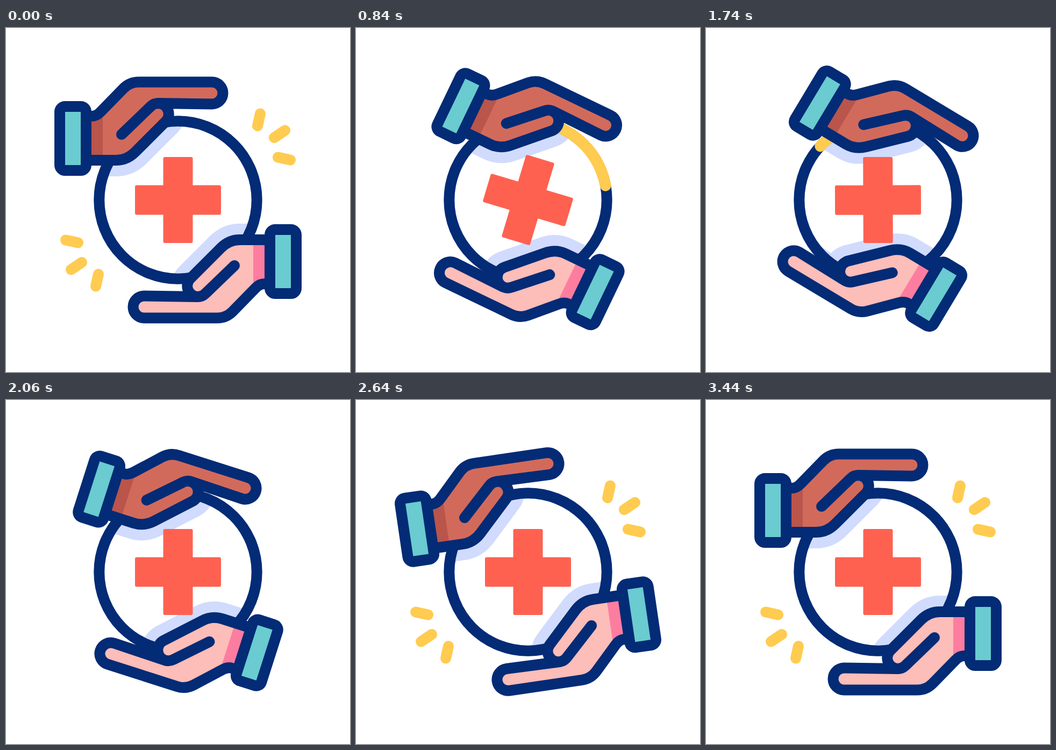
These frames come from a looping animation (640x640 px, 3600 ms). An HTML page:

```html
<!DOCTYPE html>
<html lang="en">
<head>
<meta charset="utf-8">
<title>Caring hands</title>
<style>
  html, body { margin: 0; height: 100%; overflow: hidden; background: #fff; }
  svg { display: block; width: 100%; height: 100%; }
  .line { stroke: #032b76; stroke-width: 20; stroke-linecap: round; stroke-linejoin: round; }
  .shadow { fill: #d1dbfd; stroke: #d1dbfd; stroke-width: 60; stroke-linejoin: round; }
  .yellow { fill: none; stroke: #ffcb50; stroke-width: 20; stroke-linecap: round; }
  #arc { stroke-width: 21; }
  .dark { --skin: #d26a5b; --wrist: #b9554b; }
  .light { --skin: #fdbdb8; --wrist: #fd7da0; }
</style>
</head>
<body>
<svg viewBox="0 0 640 640">
  <defs>
    <path id="palm" d="M150 164H160Q168 164 175.5 156.5L218.7 112.2A40 40 0 0 1 247 100.5H383A20.5 20.5 0 0 1 383 141.5L283 140A20 20 0 0 1 297 174L240 231Q225 246 205 246H150M215 198L269 146A20 20 0 0 1 283 140"/>
    <g id="hand">
      <use href="#palm" fill="var(--skin)"/>
      <path d="M150 164H180V246H150Z" fill="var(--wrist)"/>
      <use href="#palm" class="line" fill="none"/>
      <rect x="100" y="146" width="49" height="119" rx="10" class="line" fill="#6acbd0"/>
    </g>
    <clipPath id="disc"><circle cx="320" cy="320" r="147"/></clipPath>
  </defs>

  <g clip-path="url(#disc)">
    <use href="#palm" class="shadow top"/>
    <use href="#palm" class="shadow bottom"/>
  </g>
  <path id="cross" d="M-24.5-77H24.5V-24.5H77V24.5H24.5V77H-24.5V24.5H-77V-24.5H-24.5Z"
        fill="#ff6151" stroke="#ff6151" stroke-width="6" stroke-linejoin="round"/>
  <circle cx="320" cy="320" r="146.7" class="line" fill="none"/>
  <circle id="arc" cx="320" cy="320" r="146.7" class="yellow" pathLength="360"/>

  <g id="ticks" class="yellow">
    <path d="M468 182L473 159.5" pathLength="1"/>
    <path d="M499 204L519 190.5" pathLength="1"/>
    <path d="M506 240.5L529 245.5" pathLength="1"/>
  </g>
  <use href="#ticks" transform="rotate(180 320 320)"/>

  <use href="#hand" class="dark top"/>
  <use href="#hand" class="light bottom"/>
</svg>
<script>
const LOOP = 3600;
const $ = s => document.querySelector(s);
const all = s => [...document.querySelectorAll(s)];
const tops = all('.top'), bottoms = all('.bottom'), ticks = all('#ticks path');

// time, hand angle, shift x, shift y
const KEYS = [
  [0, 0, 0, 0], [340, 0, 0, 0], [560, 5.5, 2, 2.7], [840, 25.6, 1.6, 13],
  [1080, 33.3, -0.5, 18], [1220, 35, -1.5, 19.3], [1380, 35.7, -1.7, 20],
  [1640, 33.3, -0.5, 19.3], [1740, 31, 0.5, 18.5], [2160, 13, 5, 13],
  [2380, 1.4, 5.2, 9.2], [2760, -10, 3, 3], [2920, -8.5, 3, 2],
  [3250, -2.2, 1, 0.5], [3440, 0, 0, 0], [LOOP, 0, 0, 0]
];

const ease = (t, from, to) => {
  const s = Math.min(1, Math.max(0, (t - from) / (to - from)));
  return s * s * (3 - 2 * s);
};

// Monotone cubic interpolation of one key column
function track(t, col) {
  const slope = i => i < 0 || i > KEYS.length - 2 ? 0 :
    (KEYS[i + 1][col] - KEYS[i][col]) / (KEYS[i + 1][0] - KEYS[i][0]);
  const tangent = i => {
    const a = slope(i - 1), b = slope(i);
    return a * b <= 0 ? 0 : 2 * a * b / (a + b);
  };
  const i = KEYS.findIndex(k => k[0] > t) - 1;
  const span = KEYS[i + 1][0] - KEYS[i][0], u = (t - KEYS[i][0]) / span, v = 1 - u;
  return KEYS[i][col] * v * v * (1 + 2 * u) + KEYS[i + 1][col] * u * u * (3 - 2 * u)
    + span * u * v * (tangent(i) * v - tangent(i + 1) * u);
}

function dash(el, start, end) {
  el.style.visibility = end - start > 0.001 ? 'visible' : 'hidden';
  el.setAttribute('stroke-dasharray', `${Math.max(0, end - start)} 999`);
  el.setAttribute('stroke-dashoffset', -start);
}

function draw(t) {
  const [angle, x, y] = [1, 2, 3].map(col => track(t, col));
  const pose = k => `translate(${x} ${y * k}) rotate(${angle} 320 320)`;
  tops.forEach(el => el.setAttribute('transform', pose(1)));
  bottoms.forEach(el => el.setAttribute('transform', 'rotate(180 320 320) ' + pose(1.27)));

  $('#cross').setAttribute('transform', `translate(320 320) rotate(${360 * ease(t, 704, 1756)})`);

  const head = 720 * ease(t, 604, 1752), tail = 720 * ease(t, 706, 1932);
  $('#arc').setAttribute('transform', `rotate(${tail - 90} 320 320)`);
  dash($('#arc'), 0, head - tail);

  ticks.forEach((el, i) => {
    const d = 140 * i;
    if (t < 1000) dash(el, ease(t, d, d + 160), 1);
    else dash(el, 0, ease(t, 2120 + d, 2280 + d));
  });
}

function frame() {
  draw(performance.now() % LOOP);
  requestAnimationFrame(frame);
}
frame();
</script>
</body>
</html>
```
